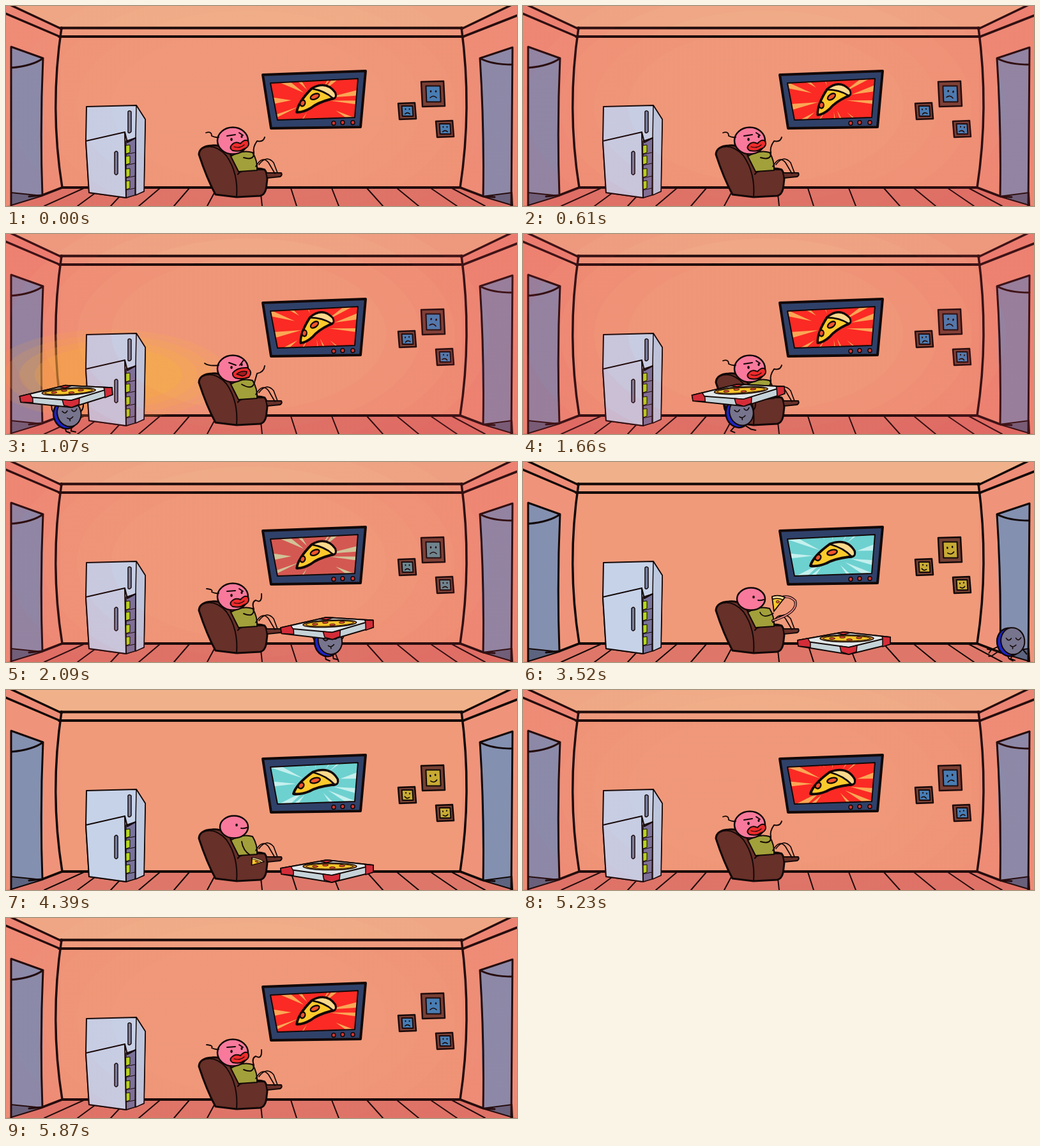
An HTML page with a canvas for the animation above (5920 ms loop, 800 px wide and 314 px high).

```html
<!DOCTYPE html>
<html lang="en">
<head>
<meta charset="utf-8">
<title>Pizza delivery</title>
<style>
html, body { margin: 0; height: 100%; overflow: hidden; background: #ef997a; }
canvas { display: block; width: 100vw; height: 100vh; }
</style>
</head>
<body>
<canvas id="stage" width="800" height="314"></canvas>
<script>
const g = document.getElementById('stage').getContext('2d');
const LOOP = 5920, INK = '#120807';
const TV_POSES = 'ACA' + 'BCA'.repeat(7) + 'CABACABC';

const ramp = (t, a, b) => Math.min(1, Math.max(0, (t - a) / (b - a)));
const ease = u => u * u * (3 - 2 * u);
const rnd = n => { const v = Math.sin(n * 91.7) * 4375.5; return v - Math.floor(v); };

// Fills and/or strokes an SVG path.
function p(d, fill, width = 2.5, ink = INK) {
  const path = new Path2D(d);
  if (fill) { g.fillStyle = fill; g.fill(path); }
  if (width) { g.lineWidth = width; g.strokeStyle = ink; g.stroke(path); }
}
function oval(x, y, rx, ry, fill, width = 2.5, turn = 0) {
  g.beginPath();
  g.ellipse(x, y, rx, ry, turn, 0, 7);
  g.fillStyle = fill;
  g.fill();
  if (width) { g.lineWidth = width; g.strokeStyle = INK; g.stroke(); }
}
function group(draw, x = 0, y = 0, turn = 0, alpha = 1, sx = 1, sy = 1) {
  if (alpha <= 0) return;
  g.save();
  g.translate(x, y);
  g.rotate(turn);
  g.scale(sx, sy);
  g.globalAlpha *= alpha;
  draw();
  g.restore();
}

function room() {
  p('M0 0H800V314H0Z', '#f09a7a', 0);
  p('M0 0H85V285L0 314ZM800 0H714V285L800 314Z', '#ef947a', 0);
  p('M0 0H800L714 35H87Z', '#f0b18a', 0);
  p('M0 0H8L87 35V48H84L0 12ZM800 0H790L714 35V48H716L800 15Z', '#ed8c77', 0);
  p('M87 35H714V48H87Z', '#f0a080', 0);
  p('M88 285H711L747 298L800 314H0L57 297Z', '#de7769', 0);
  const planks = [[122, 60], [150, 112], [190, 164], [241, 208], [287, 263], [330, 315],
    [398, 401], [446, 455], [510, 521], [565, 590], [612, 646], [665, 706], [698, 750]];
  for (const [a, b] of planks) p(`M${a} 286L${b} 314`, 0, 2);
  p('M8 -1L87 36M0 12L84 48M790 -1L713 36M800 15L716 48', 0, 3.5);
  p('M85 34.5H715M83 48H716M88 285H711', 0, 4);
  p('M87 34Q68 160 88 285L57 297M713 34Q730 160 711 285L745 298', 0, 3.5);
  p('M8 64L58 82L57 297L8 314Z', '#8490b0', 0);
  p('M8 293L57 298L8 313Z', '#5c6480', 2);
  p('M8 97Q42 94 58 82M8 314V64L58 82Q53 190 57 297L36 299', 0, 3);
  p('M793 65L742 82L747 299L793 314Z', '#8490b0', 0);
  p('M792 293L746 299L793 313Z', '#5c6480', 2);
  p('M793 92Q760 92 742 82M791 314L793 65L742 82Q749 190 747 299L765 300', 0, 3);
}

function fridge() {
  p('M126 158L204 156L218 178L216 291L188 301L130 293L125 212Z', '#c6d2e8', 2);
  p('M204 156L218 178L216 291L203 297V207Z', '#bcc8df', 1.5);
  p('M188 212L203 207L202 297L188 301Z', '#78739a', 1.5);
  for (const y of [219, 236, 256, 275]) {
    p(`M188 ${y}L194 ${y - 1}V${y + 11}L188 ${y + 13}Z`, '#b4da1c', 1);
    p(`M188 ${y + 14}L202 ${y + 11}`, 0, 1);
  }
  p('M125 212L186 198L188 301L130 293Z', '#c6d2e8', 2);
  p('M186 198L190 214L203 207', 0, 2);
  p('M191 166Q193 163 196 166V197Q193 201 191 198Z', '#7a82a0', 1.5);
  p('M170 230Q173 226 175 230V263Q172 267 170 263Z', '#7a82a0', 1.5);
}

function picture(x, y, w, h, calm, turn) {
  p(`M${x} ${y + 1}L${x + w - 2} ${y}L${x + w} ${y + h - 1}L${x + 2} ${y + h}Z`, '#744034');
  const inner = `M${x + w * .2} ${y + h * .19}h${w * .6}l1 ${h * .62}h${-w * .6}Z`;
  p(inner, '#3f80b8', 0);
  group(() => p(inner, '#c7aa34', 0), 0, 0, 0, calm);
  p(inner, 0, 2);
  const s = w / 37, bend = calm > .5 ? 4 : -4;
  group(() => {
    oval(-4 * s, -4 * s, 1.3 * s, 1.8 * s, INK, 0);
    oval(4 * s, -4 * s, 1.3 * s, 1.8 * s, INK, 0);
    p(`M${-5 * s} ${(5 - bend / 4) * s}Q0 ${(5 + bend) * s} ${5 * s} ${(5 - bend / 4) * s}`, 0, 1.6);
  }, x + w / 2 + .5, y + h / 2, turn);
}

function rays(color, seed) {
  g.fillStyle = color;
  for (let i = 0; i < 15; i++) {
    const a = (i + rnd(i + seed) * .8) * Math.PI * 2 / 15;
    const near = 18 + 22 * rnd(i * 3 + seed), half = .04 + .07 * rnd(i * 7 + seed);
    g.beginPath();
    g.moveTo(near * Math.cos(a), near * Math.sin(a));
    g.lineTo(95 * Math.cos(a - half), 95 * Math.sin(a - half));
    g.lineTo(95 * Math.cos(a + half), 95 * Math.sin(a + half));
    g.fill();
  }
}

function television(pose, calm) {
  const screen = 'M414 121L551 114L546 175L425 179Z';
  p('M402 108L563 102L555 190L415 192Z', '#2f4169', 4);
  g.save();
  g.clip(new Path2D(screen));
  p(screen, '#fb2a24', 0);
  group(() => rays('#fba655', pose * 20 + 2), 484, 147);
  group(() => {
    p(screen, '#6dd1d0', 0);
    group(() => rays('#c4f0ee', pose * 20 + 2), 484, 147);
  }, 0, 0, 0, calm);
  g.restore();
  p(screen, 0, 2);
  const [turn, squeeze] = [[-.12, .92], [-.3, .86], [0, 1]][pose];
  group(() => {
    p('M-35 17Q-31 2 -5 -17Q22 -27 34 -6Q36 3 25 3Q2 6 -10 13Q-25 19 -35 17Z', '#fdca2c', 4);
    p('M-5 -17Q22 -27 34 -6Q36 3 29 2Q17 -11 -5 -17Z', '#fbd98c', 2.8);
    oval(-1, -4, 8, 4, '#f0542c', 2.4, -.25);
    oval(-23, 4, 4, 5, '#f0542c', 2.4, .6);
  }, 485, 146, turn, 1, squeeze);
  for (const x of [513, 527, 543]) oval(x, 184 - (x > 513), 3, 3.2, '#d8342e', 1.5);
}

function chair() {
  p('M302 233Q303 220 322 219Q343 217 352 234L366 260Q392 252 405 257Q411 264 408 280Q407 296 398 298L361 300L328 296Q314 270 302 233Z', '#673029', 3);
  p('M306 224Q326 214 345 235Q364 262 361 300', 0, 2);
  p('M363 264Q368 257 385 257L405 257', 0, 2.2);
  p('M407 262L431 262Q433 266 429 268L409 270Z', '#673029', 2);
}

function sitter(calm, pose, chew) {
  p('M352 236Q370 225 386 230Q394 243 393 258L364 260Z', '#a2a03a', 2);
  p('M391 252Q401 234 411 246L421 263M396 249Q408 233 419 246L425 262', 0, 1.7);
  if (calm) {
    oval(357, 215 + chew, 22, 17.5, '#f8799c');
    oval(361, 212 + chew, 1.8, 2.3, INK, 0);
    p(`M368 ${217 + chew}Q372 ${218 + chew} 377 ${216 + chew}`, 0, 2);
    return;
  }
  oval(355, 211.5, 24, 21, '#f8799c');
  if (pose === 2) {
    p('M355 218Q362 209 378 210Q387 217 380 225Q369 229 359 226Q354 223 355 218Z', '#ef2b2c', 2);
    p('M361 220Q368 214 377 216Q377 222 370 223Z', '#a01d20', 1.5);
    p('M349 202L360 206M366 206L372 198M311 203Q318 208 333 206', 0, 2);
    p('M369 236Q386 246 389 233L393 219Q404 217 405 207', 0, 2);
  } else {
    const q = pose;
    p(`M352 220Q358 ${211 + q} 367 216Q374 208 379 212Q383 221 371 225Q367 229 355 227Q350 224 352 220Z`, '#ef2b2c', 2);
    p('M357 221Q366 224 373 218', 0, 1.2);
    p(`M346 ${204 - q}L359 202M365 199L371 203`, 0, 2);
    p(`M${313 + q} 199Q${322 + q * 3} ${196 + q * 4} 322 204Q328 207 333 206`, 0, 1.8);
    p(q ? 'M372 238Q388 245 388 231Q384 220 391 217Q401 223 400 207'
        : 'M372 238Q389 243 388 230Q386 222 393 212Q403 214 405 206', 0, 2);
  }
  oval(353, 209.5, 1.8, 2.4, INK, 0);
  oval(369, 205, 1.6, 2.2, INK, 0);
}

function slice() {
  p('M-9 -11Q0 -15 11 -10L-6 12Z', '#fdc92e', 1.8);
  p('M-9 -11Q0 -15 11 -10L8 -6Q0 -10 -8 -7Z', '#fbdf98', 1.5);
  oval(0, -3, 2.5, 2, '#f0642c', .8);
}

function meal(t) {
  const down = ease(ramp(t, 3900, 4200)), fade = 1 - ramp(t, 4540, 4900);
  const lift = Math.sin((t - 2730) / 95) * 4 * (1 - down) * ramp(t, 2300, 2450);
  const x = 401 - 9 * down - lift * .6, y = 226 + 45 * down - lift;
  group(() => {
    if (down < 1) {
      const arm = `M391 249Q432 236 426 218Q417 209 ${x + 6} ${y - 10}`;
      p(`M371 236Q376 247 ${x - 7} ${y + 15}`, 0, 1.8);
      group(() => {
        p(arm, 0, 4.2);
        p(arm, 0, 1.8, '#f08a86');
      }, 0, 0, 0, 1 - down);
    } else p('M369 238Q371 252 382 259', 0, 1.8);
    group(slice, x, y, .3 * down, 1, 1, 1 - .5 * down);
  }, 0, 0, 0, fade);
}

function box() {
  p('M-72 0L0 -13L73 -5V6L8 22L-71 9Z', '#c5d3d8', 2);
  p('M-72 0L0 -13L73 -5L8 11Z', '#e0e6e8', 2);
  p('M-72 0L-56 -3L-52 4V11L-71 9ZM-6 9L8 11L21 8L20 18L8 22L-4 18ZM60 -6L73 -5V6L61 10V-3ZM-11 -11L0 -13L11 -12L0 -9Z', '#d42c38', 1.5);
  oval(5, -3, 42, 5.5, '#c98222', 1.5);
  oval(5, -3, 37, 4, '#fcc42a', 1);
  for (const [x, y] of [[-18, -3], [-2, -5], [9, -1], [24, -4]]) oval(x, y, 4.5, 1.5, '#e04a2a', .7);
}

function helper(t, carrying) {
  const step = Math.sin(t / 55) * 8;
  p(`M-7 18L${-9 + step} 27L${-3 + step} 30M5 19L${8 - step} 27L${15 - step} 29`, 0, 2);
  if (carrying) p('M-18 2Q-27 -8 -23 -20M18 0Q28 -6 25 -19', 0, 2);
  else p(`M-18 8L${-33 + step / 3} 15l-6 -1m6 1l-3 5M-16 14L${-26 - step / 3} 24l-5 1M17 9L${23 + step / 3} 18`, 0, 2);
  oval(-3, 1, 19, 22, '#1c24c8', 2.5, -.2);
  oval(2.5, -1, 18.5, 21, '#77748e', 2, -.2);
  p('M-8 -5Q-4 1 0 -5M7 -6Q11 0 15 -7M-1 6Q3 10 8 5M3 8V11', 0, 1.6);
}

function delivery(t) {
  if (t < 600 || t > 4900) return;
  const x = Math.min(502, 93 + .412 * (t - 1070));
  const down = ease(ramp(t, 2030, 2230)), walking = t > 2210;
  const bob = (1 - down) * Math.sin(t / 55) * 1.2;
  g.save();
  g.beginPath();
  g.rect(8, 0, 783, 314);
  g.clip();
  const drawBox = () => group(box, x, 250 + 30 * down + bob, -.06 * (1 - down), 1 - ramp(t, 4540, 4900));
  if (walking) drawBox();
  if (t < 3760) {
    const hx = walking ? 502 + .2 * (t - 2210) : x + 3;
    group(() => helper(t, !walking), hx, 282 + bob, walking ? .06 : -.08);
  }
  if (!walking) drawBox();
  g.restore();
}

// Stepped ellipse: alpha a inside the core radius, then bands towards alpha b at the rim.
function light(x, y, rx, ry, rgb, a, b, core, bands) {
  group(() => {
    const grad = g.createRadialGradient(0, 0, 0, 0, 0, 1);
    for (let i = 0; i <= bands; i++) {
      const color = `rgba(${rgb},${a + (b - a) * i / bands})`;
      grad.addColorStop(i && core + (1 - core) * (i - 1) / bands, color);
      grad.addColorStop(core + (1 - core) * i / bands, color);
    }
    g.fillStyle = grad;
    g.fillRect(-9, -9, 18, 18);
  }, x, y, 0, 1, rx, ry);
}

function draw(t) {
  const calm = ramp(t, 1940, 2500) * (1 - ramp(t, 4540, 4900));
  const rage = (.45 + .55 * ramp(t, 300, 1000) * (1 - ramp(t, 2500, 2600))) * (1 - calm);
  const pose = 'ABC'.indexOf(TV_POSES[Math.floor((t + 50) / 185) % 32]);
  const turn = [0, .15, -.18][pose];
  const happy = t > 2200 && t < 4620;
  const eating = t > 2300 && t < 3900;

  room();
  const glow = ramp(t, 700, 1000) * (1 - ramp(t, 1120, 1450));
  if (glow) light(160 + .3 * (t - 1070), 221, 210, 80, '248,184,56', .58 * glow, 0, .55, 4);
  fridge();
  picture(650, 118, 37, 40, calm, turn);
  picture(614, 152, 28, 26, calm, -turn);
  picture(673, 180, 28, 26, calm, turn);
  light(380, 157, 430, 240, '230,60,80', .04 * rage, .21 * rage, .5, 4);

  television(pose, calm);
  chair();
  sitter(happy, Math.floor(t * 65 / LOOP) % 3, eating ? Math.sin(t / 70) * .8 : 0);
  if (t > 2300 && t < 4900) meal(t);
  else if (happy) p('M369 238Q371 252 382 259', 0, 1.8);
  delivery(t);
}

g.lineCap = g.lineJoin = 'round';
const start = performance.now();
function tick() {
  draw((performance.now() - start) % LOOP);
  requestAnimationFrame(tick);
}
tick();
</script>
</body>
</html>
```
